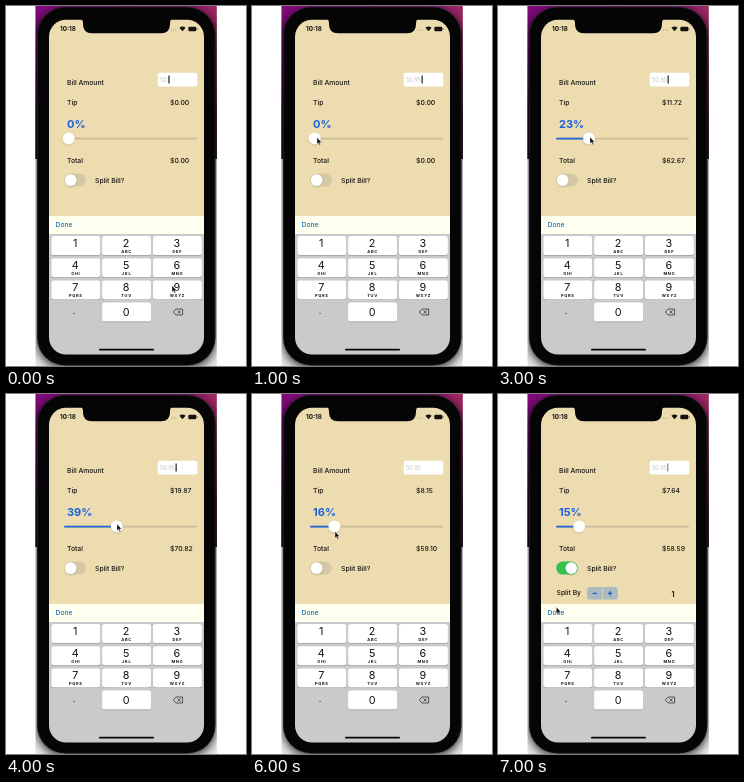
An HTML page for the animation above (8 s loop, 240x360 px).

```html
<!DOCTYPE html>
<html lang="en">
<head>
<meta charset="utf-8">
<title>Tip calculator</title>
<style>
html, body { margin: 0; width: 100%; height: 100%; overflow: hidden; background: #fff; }
svg { display: block; width: 100vw; height: 100vh; }
text { font-family: Inter, Roboto, sans-serif; font-size: 6.8px; font-weight: 500; fill: #15130f; }
.time { font-size: 6.3px; font-weight: 700; }
.rate { font-size: 11px; font-weight: 700; fill: #1c62dc; }
.field { font-size: 5.5px; font-weight: 400; fill: #c4c4c6; }
.done { fill: #1c6fc4; }
.digit { font-size: 10.8px; font-weight: 400; text-anchor: middle; }
.letters { font-size: 4px; font-weight: 700; letter-spacing: .7px; text-anchor: middle; }
.count { font-size: 7px; font-weight: 700; }
</style>
</head>
<body>
<svg viewBox="0 0 240 360">
  <defs>
    <linearGradient id="desk" x1="0" x2="1">
      <stop offset="0" stop-color="#820a7c"/>
      <stop offset=".8" stop-color="#7d1070"/>
      <stop offset="1" stop-color="#a52a62"/>
    </linearGradient>
    <linearGradient id="dusk" x1="0" y1="0" x2="0" y2="1">
      <stop offset="0" stop-color="#14061c" stop-opacity="0"/>
      <stop offset=".7" stop-color="#14061c" stop-opacity=".85"/>
      <stop offset="1" stop-color="#14061c"/>
    </linearGradient>
    <clipPath id="stage"><rect x="29.5" width="181.3" height="360"/></clipPath>
    <clipPath id="glass"><rect x="43" y="13.7" width="155" height="334.8" rx="17"/></clipPath>
    <filter id="soft" x="-50%" y="-50%" width="200%" height="200%">
      <feDropShadow dx="0" dy=".8" stdDeviation="1.1" flood-opacity=".17"/>
    </filter>
    <filter id="shade" x="-20%" y="-10%" width="140%" height="120%">
      <feDropShadow dx="0" dy="3" stdDeviation="5" flood-opacity=".8"/>
    </filter>
  </defs>

  <g clip-path="url(#stage)">
    <rect x="29" width="183" height="360" fill="#e6e6e6"/>
    <rect x="29" width="183" height="153" fill="url(#desk)"/>
    <rect x="29" width="183" height="153" fill="url(#dusk)"/>
    <rect x="31" y="1" width="178.5" height="358.5" rx="28" fill="#1b1b1d" filter="url(#shade)"/>
    <rect x="32" y="1.8" width="176.5" height="357" rx="27.2" fill="#050506"/>
  </g>

  <g clip-path="url(#glass)">
    <rect x="43" y="13" width="155" height="198" fill="#ecdcb0"/>

    <text class="time" x="54" y="25.2">10:18</text>
    <g fill="#15130f">
      <circle cx="165.5" cy="24" r=".5" opacity=".4"/>
      <circle cx="167.7" cy="24" r=".5" opacity=".4"/>
      <circle cx="169.9" cy="24" r=".5" opacity=".4"/>
      <path d="M173.4 21.8Q176.5 19.4 179.6 21.8L176.5 25.3Z"/>
      <rect x="182.3" y="20.8" width="8" height="4.4" rx="1.2"/>
      <rect x="190.7" y="22.2" width=".7" height="1.6" rx=".3"/>
    </g>

    <text x="61" y="78.8">Bill Amount</text>
    <rect x="151.7" y="66.7" width="39.6" height="13.8" rx="2" fill="#fff"/>
    <text class="field" id="bill" x="154" y="75.6"></text>
    <rect id="caret" y="69.5" height="8" fill="#303238"/>

    <text x="61" y="98.6">Tip</text>
    <text id="tip" x="164" y="98.6"></text>
    <text class="rate" id="rate" x="61" y="121.8"></text>

    <rect x="58" y="131.8" width="133" height="1.6" rx=".8" fill="#cabd99"/>
    <rect id="fill" x="58" y="131.7" height="1.8" rx=".9" fill="#2067dc"/>
    <circle id="knob" cy="132.4" r="5.9" fill="#fff" filter="url(#soft)"/>

    <text x="61" y="156.7">Total</text>
    <text id="total" x="164" y="156.7"></text>

    <rect id="track" x="58.2" y="167.6" width="21.6" height="13" rx="6.5"/>
    <circle id="thumb" cy="174.1" r="5.8" fill="#fff" filter="url(#soft)"/>
    <text x="89" y="176.7">Split Bill?</text>

    <g id="split">
      <text x="58.5" y="201">Split By</text>
      <rect x="89.2" y="193" width="30.5" height="12.6" rx="2.6" fill="#a9bbc0"/>
      <path d="M104.5 193V205.6" stroke="#dcd5b5" stroke-width=".8"/>
      <path d="M94.8 199.4H99M110 199.4H114.2M112.1 197.3V201.5" stroke="#1c62c8" stroke-width="1.3"/>
      <text class="count" x="173.5" y="203.2">1</text>
    </g>

    <rect x="43" y="210" width="155" height="18.3" fill="#fffff0"/>
    <text class="done" x="49.5" y="221.4">Done</text>
    <rect x="43" y="228" width="155" height="121" fill="#c9cacc"/>
    <g id="keys"></g>
    <text class="digit" x="68" y="308" style="font-size:9px">.</text>
    <path d="M167.3 306L170 303H176.6V309H170Z M171.6 304.5L174.6 307.5M174.6 304.5L171.6 307.5"
      fill="none" stroke="#222" stroke-width=".7" stroke-linejoin="round"/>
    <rect x="93" y="342.7" width="55" height="1.9" rx=".95" fill="#080808"/>
  </g>

  <path d="M74 12H167Q164 13.7 164 17.2V18.2Q164 27.2 155 27.2H86Q77 27.2 77 18.2V17.2Q77 13.7 74 12Z" fill="#050506"/>

  <path id="pointer" d="M0 0V6.6L1.5 5.3L2.5 7.7L3.6 7.2L2.6 4.9H4.6Z"
    fill="#080808" stroke="#fff" stroke-width=".4" stroke-linejoin="round"/>
</svg>
<script>
const LOOP = 8000, STEP = 1000, BILL = 50.95;
const $ = id => document.getElementById(id);
const money = v => '$' + v.toFixed(2);

const letters = ['', 'ABC', 'DEF', 'GHI', 'JKL', 'MNO', 'PQRS', 'TUV', 'WXYZ'];
const key = (col, row, digit, sub) => {
  const x = 45.3 + col * 50.8, y = 230 + row * 22.2, mid = x + 24.5;
  return `<rect x="${x}" y="${y + .6}" width="49" height="19" rx="2.6" fill="#8b8c8f"/>
    <rect x="${x}" y="${y}" width="49" height="19" rx="2.6" fill="#fff"/>
    <text class="digit" x="${mid - .5}" y="${y + (row === 3 ? 13.5 : 11)}">${digit}</text>
    <text class="letters" x="${mid}" y="${y + 17}">${sub}</text>`;
};
$('keys').innerHTML = letters.map((s, i) => key(i % 3, Math.floor(i / 3), i + 1, s)).join('') + key(1, 3, 0, '');

// Each second of screen recording: slider percent, pointer tip, caret width
const states = [
  { pct: 0, at: [166, 279.5], caret: 1.3, typed: '50' },
  { pct: 0, at: [65, 131.5], caret: 1.3 },
  { pct: 8, at: [73.5, 131], caret: 1.3 },
  { pct: 23, at: [92, 131], caret: 1.3 },
  { pct: 39, at: [111, 130], caret: 1.3 },
  { pct: 100, at: [186.7, 133.5], caret: .7 },
  { pct: 16, at: [83, 137.5], caret: 0 },
  { pct: 15, at: [58.3, 213], caret: .7, split: true }
];

function draw(ms) {
  const s = states[Math.floor(ms % LOOP / STEP)];
  const tip = BILL * s.pct / 100;
  const x = 62.7 + s.pct * 1.233;
  const typed = s.typed || BILL.toFixed(2);
  $('bill').textContent = typed;
  $('caret').setAttribute('x', typed.length > 2 ? 169.5 : 162.3);
  $('caret').setAttribute('width', s.caret);
  $('rate').textContent = s.pct + '%';
  $('tip').textContent = money(tip);
  $('total').textContent = money(s.pct ? BILL + tip : 0);
  $('knob').setAttribute('cx', x);
  $('fill').setAttribute('width', x - 58);
  $('track').setAttribute('fill', s.split ? '#35c04f' : '#d5c8a4');
  $('thumb').setAttribute('cx', s.split ? 73.3 : 64.6);
  $('split').setAttribute('visibility', s.split ? 'visible' : 'hidden');
  $('pointer').setAttribute('transform', `translate(${s.at})`);
}

const start = performance.now();
function tick() {
  draw(performance.now() - start);
  requestAnimationFrame(tick);
}
tick();
</script>
</body>
</html>
```
